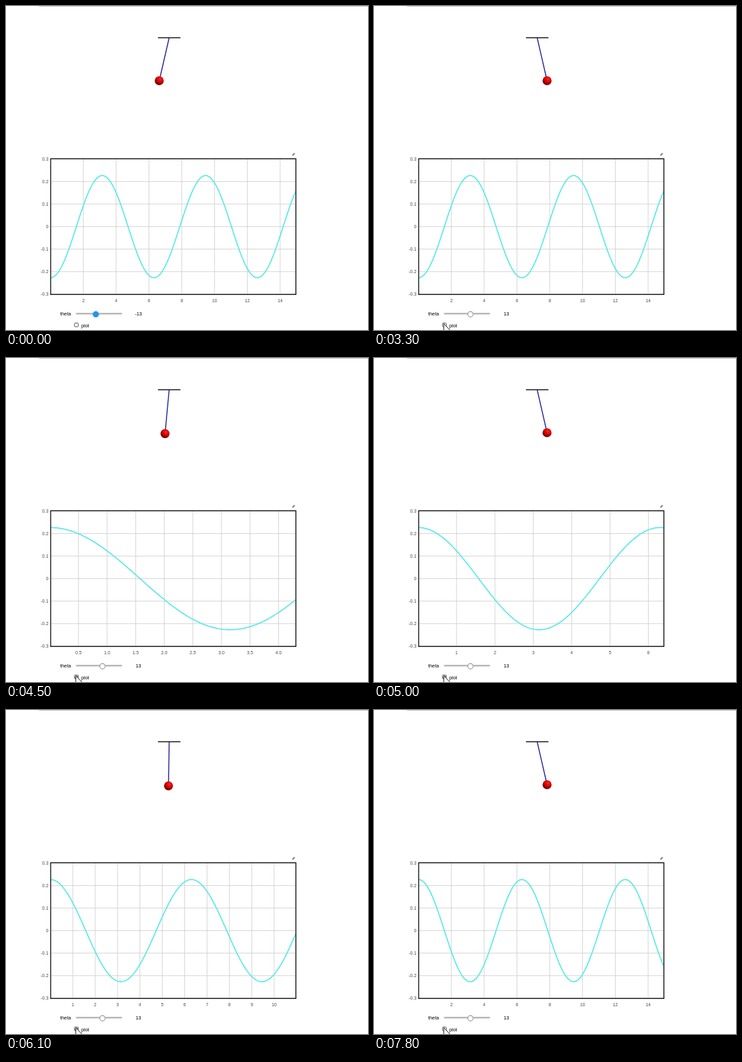
Animation, 548 px wide and 490 px high, one loop 8000 ms. Source, as an HTML page:

```html
<!DOCTYPE html>
<html lang="en">
<head>
<meta charset="utf-8">
<title>Pendulum</title>
<style>
html, body { margin: 0; width: 100%; height: 100%; overflow: hidden; background: #fff; }
svg { display: block; font-family: "Liberation Sans", Arial, sans-serif; }
text { font-size: 7.3px; fill: #000; }
#plot text { font-size: 6.8px; fill: #4c4c4c; }
.mid { text-anchor: middle; }
.end { text-anchor: end; }
</style>
</head>
<body>
<svg width="548" height="490" viewBox="0 0 548 490">
  <defs>
    <radialGradient id="red" cx=".6" cy=".33" r=".68">
      <stop offset="0" stop-color="#f8281e"/>
      <stop offset=".5" stop-color="#d80000"/>
      <stop offset="1" stop-color="#560000"/>
    </radialGradient>
  </defs>
  <path d="M50 .5H548" stroke="#c4c4c4"/>

  <line id="rod" x1="247" y1="48" stroke="#2a2a9c" stroke-width="1.5"/>
  <path d="M230 48H264" stroke="#1a1a1a" stroke-width="1.7"/>
  <circle id="ball" r="6.8" fill="url(#red)"/>

  <path d="M433 226.5L434 224L437 222L437.5 223.5L435 226Z" fill="#777"/>
  <g id="plot"></g>

  <text x="82" y="468">theta</text>
  <path d="M107 465.3H174.500" stroke="#b8b8b8" stroke-width="2.4" stroke-linecap="round"/>
  <circle id="knob" cy="466.2"/>
  <text id="value" class="mid" x="200.5" y="468"></text>

  <rect x="103.700" y="479.500" width="5.600" height="5.600" rx=".8" fill="#fff" stroke="#555" stroke-width="1"/>
  <path id="tick" d="M104.500 482.500L106 484L108.500 480.800" fill="none" stroke="#222" stroke-width="1.3"/>
  <text x="114" y="486">plot</text>
  <path id="cursor" d="M0 0V13.500L3.200 10.700L5.300 15.200L7.300 14.300L5.300 10H9.500Z" fill="#fff" stroke="#222" stroke-width="1"/>
</svg>
<script>
const LOOP = 8000, STEP = 100, START = 3500, END = 7200, T_MIN = 0.015, T_MAX = 14.95;
const RIGHT = 438.6, TOP = 231.5, BOTTOM = 435.8;
const AMP = 13 * Math.PI / 180;
const OMEGA = 1 / (1 + AMP * AMP / 16); // finite swing slows the pendulum slightly

// [ms, value] tables, linear between rows
const DRAG = [[400, -13], [800, -5], [900, -5], [1600, 14], [1700, 13]];
const RUN = [[3500, 0.1], [4000, 2.2], [5000, 6.4], [5700, 9.37], [6600, 12.96], [7100, T_MAX]];
const POINTER = [[1900, 0], [2700, 1]];

const $ = id => document.getElementById(id);
const swing = t => AMP * Math.cos(OMEGA * t);

function set(id, attrs) {
  for (const key in attrs) $(id).setAttribute(key, attrs[key]);
}

function lookup(table, ms) {
  if (ms <= table[0][0]) return table[0][1];
  for (let i = 1; i < table.length; i++) {
    const [a, va] = table[i - 1], [b, vb] = table[i];
    if (ms <= b) return va + (vb - va) * (ms - a) / (b - a);
  }
  return table[table.length - 1][1];
}

function tickSize(range, count) {
  const delta = range / count;
  const unit = 10 ** Math.floor(Math.log10(delta));
  const n = delta / unit;
  return unit * (n < 1.5 ? 1 : n < 2.25 ? 2 : n < 3 ? 2.5 : n < 7.5 ? 5 : 10);
}

const decimals = size => Math.max(0, -Math.floor(Math.log10(size) + 1e-9));

function ticks(min, max, size) {
  const list = [];
  for (let i = Math.ceil(min / size - 1e-6); i * size <= max + size * 1e-6; i++) {
    list.push([i * size, i ? (i * size).toFixed(decimals(size)) : "0"]);
  }
  return list;
}

function drawPlot(sign, tMax) {
  const pts = [];
  for (let i = 0; i <= 240; i++) {
    const t = T_MIN + (tMax - T_MIN) * i / 240;
    pts.push([t, sign * swing(t)]);
  }
  const ys = pts.map(p => p[1]);
  let lo = Math.min(...ys), hi = Math.max(...ys);
  const pad = (hi - lo) * 0.02;
  lo -= pad;
  hi += pad;
  const ySize = tickSize(hi - lo, 6), xSize = tickSize(tMax - T_MIN, 7.59);
  lo = Math.floor(lo / ySize) * ySize;
  hi = Math.ceil(hi / ySize) * ySize;

  const left = 67.8 + 3.6 * (decimals(ySize) - 1);
  const px = t => left + (t - T_MIN) / (tMax - T_MIN) * (RIGHT - left);
  const py = v => BOTTOM - (v - lo) / (hi - lo) * (BOTTOM - TOP);

  let grid = "", labels = "";
  for (const [v, label] of ticks(T_MIN, tMax, xSize)) {
    const x = px(v).toFixed(2);
    grid += `M${x} ${TOP}V${BOTTOM}`;
    labels += `<text class="mid" x="${x}" y="447.8">${label}</text>`;
  }
  for (const [v, label] of ticks(lo, hi, ySize)) {
    const y = py(v);
    grid += `M${left} ${y.toFixed(2)}H${RIGHT}`;
    labels += `<text class="end" x="${left - 3.6}" y="${(y + 2.4).toFixed(2)}">${label}</text>`;
  }
  const curve = pts.map(p => px(p[0]).toFixed(2) + "," + py(p[1]).toFixed(2)).join(" ");
  $("plot").innerHTML =
    `<path d="${grid}" stroke="#d0d0d0" stroke-width=".9"/>` +
    `<polyline points="${curve}" fill="none" stroke="#5ae9e6" stroke-width="1.7"/>` +
    `<path d="M${left - 0.2} ${TOP - 0.5}H${RIGHT + 0.2}V${BOTTOM + 0.4}H${left - 0.2}Z" fill="none" stroke="#222" stroke-width="1.5"/>` +
    labels;
}

function draw(ms) {
  const running = ms >= START && ms < END;
  const theta = Math.round(lookup(DRAG, ms));
  const t = lookup(RUN, ms);
  const angle = running ? swing(t) : theta * Math.PI / 180;
  const x = 247 + 66.7 * Math.sin(angle), y = 48 + 66.7 * Math.cos(angle);
  set("rod", { x2: x, y2: y });
  set("ball", { cx: x, cy: y });

  const focus = ms < 3300;
  set("knob", {
    cx: 141 + theta * 5 / 13,
    r: focus ? 4.7 : 4.1,
    fill: focus ? "#2196ec" : "#fff",
    stroke: focus ? "none" : "#999",
    "stroke-width": 1.2
  });
  $("value").textContent = theta;

  const k = lookup(POINTER, ms);
  set("cursor", {
    visibility: ms < 1600 ? "hidden" : "visible",
    transform: `translate(${146 - 40.3 * k} ${466 + 14.5 * k})`
  });
  set("tick", { visibility: running ? "visible" : "hidden" });

  if (ms < START) drawPlot(-1, T_MAX);
  else drawPlot(1, t);
}

let last = -1;
function frame() {
  const ms = Math.floor(performance.now() % LOOP / STEP) * STEP;
  if (ms !== last) draw(last = ms);
  requestAnimationFrame(frame);
}
frame();
</script>
</body>
</html>
```
